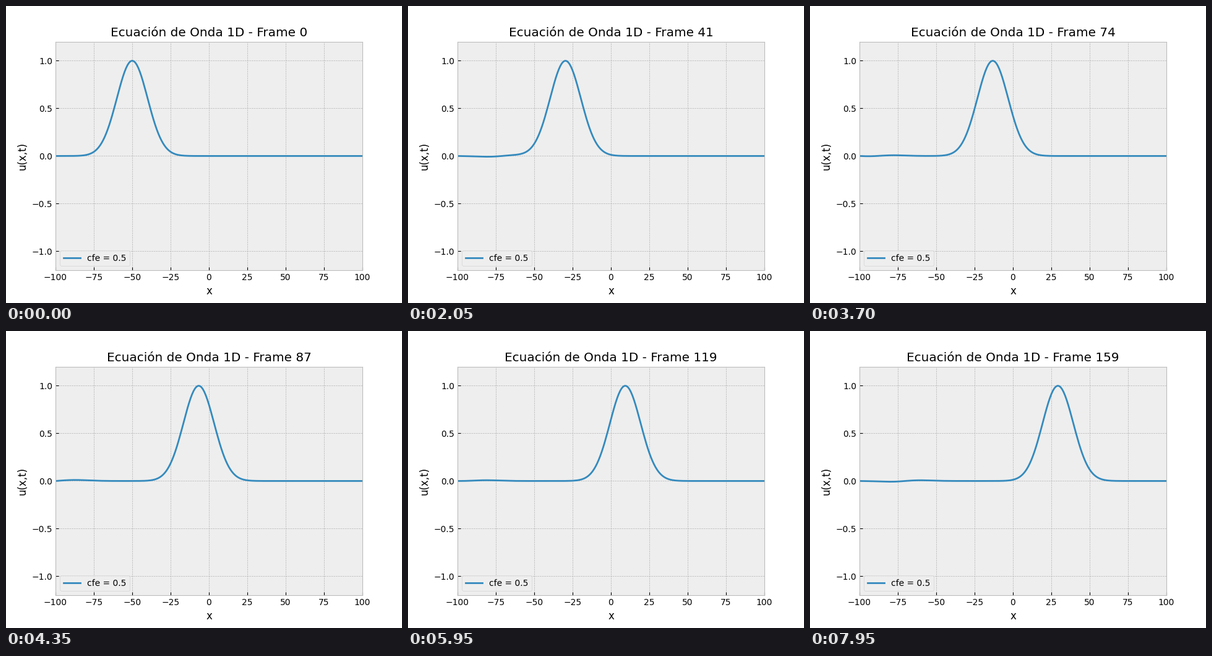
Recreate the animation shown at these times as a matplotlib script. Size 640 by 480 pixels, loop 8 s.

```python
import numpy as np
import matplotlib.pyplot as plt
from matplotlib.animation import FuncAnimation

FRAMES = 160
CFL = 0.5


def solve_wave(u0, steps, r):
    """Leapfrog solution with fixed ends; the pulse starts moving right."""
    u = np.zeros((steps, u0.size))
    u[0] = u0
    # Explicit first step of the advection equation
    u[1, 1:-1] = u0[1:-1] - r / 2 * (u0[2:] - u0[:-2])
    for n in range(1, steps - 1):
        lap = u[n, 2:] - 2 * u[n, 1:-1] + u[n, :-2]
        u[n + 1, 1:-1] = 2 * u[n, 1:-1] - u[n - 1, 1:-1] + r**2 * lap
    return u


x = np.linspace(-100, 100, 201)
waves = solve_wave(np.exp(-(x + 50) ** 2 / 200), FRAMES, CFL)

plt.style.use("bmh")
plt.rcParams["font.family"] = "DejaVu Sans"

fig, ax = plt.subplots(figsize=(6.4, 4.8), dpi=100)
line, = ax.plot(x, waves[0], label=f"cfe = {CFL}")
ax.set_xlim(-100, 100)
ax.set_ylim(-1.2, 1.2)
ax.set_xlabel("x")
ax.set_ylabel("u(x,t)")
ax.legend(loc="lower left")
title = ax.set_title("")


def update(n):
    line.set_ydata(waves[n])
    title.set_text(f"Ecuación de Onda 1D - Frame {n}")
    return line, title


anim = FuncAnimation(fig, update, frames=FRAMES, interval=50,
                     repeat=True, repeat_delay=0)
plt.show()
```
